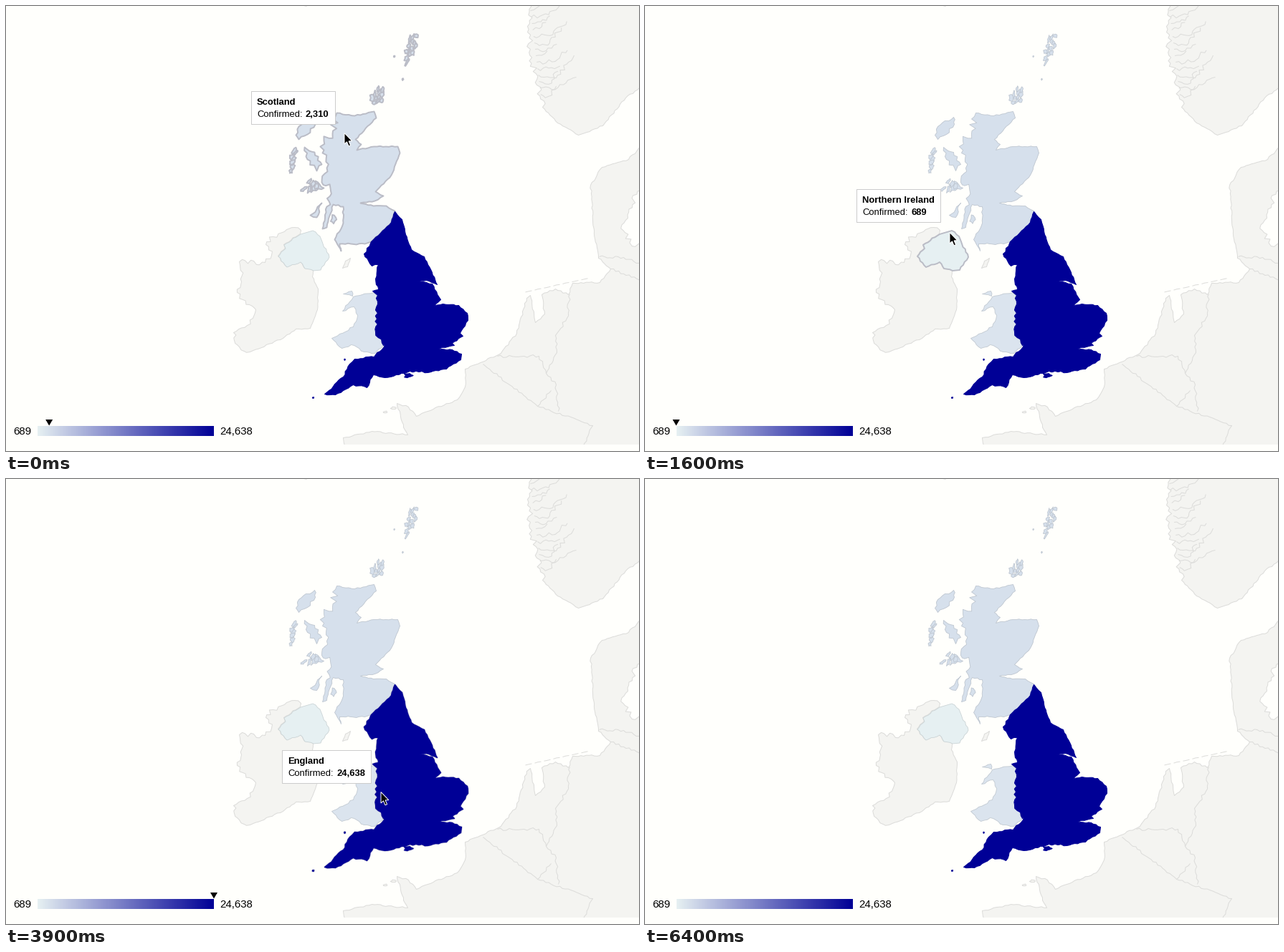
A matplotlib script for the animation above (6700 ms loop, 883 by 622 pixels).

```python
import numpy as np
import matplotlib.pyplot as plt
from matplotlib.animation import FuncAnimation
from matplotlib.collections import LineCollection, PolyCollection
from matplotlib.patches import Polygon, Rectangle

W, H, DPI = 883, 622, 100
FRAMES, STEP = 67, 100
PX = 72 / DPI
SEA, LAND, COAST = "#fffffc", "#f4f4f1", "#dcdcda"
LOW, HIGH = np.array([230, 240, 242]) / 255, np.array([0, 0, 150]) / 255
V_MIN, V_MAX = 689, 24638
rng = np.random.default_rng(4)


def coast(amp, *v):
    """Path through a few key points, ragged by up to amp pixels."""
    keys = np.reshape(v, (-1, 2)) + 0.5
    out = [keys[0]]
    for a, b in zip(keys[:-1], keys[1:]):
        d = b - a
        size = np.hypot(*d)
        n = max(1, round(size / 4))
        side = np.array([-d[1], d[0]]) / size
        out += [a + d * k / n + side * rng.uniform(-amp, amp)
                for k in range(1, n)]
        out.append(b)
    return np.array(out)


def island(amp, *v):
    return coast(amp, *v, *v[:2])


def ring(*parts):
    return np.vstack(parts)


def spin(x, y, turn):
    t = np.radians(turn)
    return np.array([x * np.cos(t) - y * np.sin(t),
                     x * np.sin(t) + y * np.cos(t)])


def islet(x, y, rx, ry, turn=0):
    a = np.linspace(0, 2 * np.pi, 11)[:-1]
    r = rng.uniform(0.5, 1.2, 10)
    return (spin(rx * r * np.cos(a), ry * r * np.sin(a), turn).T
            + (x + 0.5, y + 0.5))


def isles(n, x, y, rx, ry, turn=0):
    """Scatter n ragged islets in a tilted ellipse."""
    out = []
    for k in range(n):
        far, a = np.sqrt((k + 0.5) / n), 2.4 * k
        dx, dy = spin(rx * far * np.cos(a), ry * far * np.sin(a), turn)
        out.append(islet(x + dx, y + dy, rng.uniform(1.5, 3.5),
                         rng.uniform(3, 6), rng.uniform(0, 50)))
    return out


def shade(value):
    return LOW + (HIGH - LOW) * (value - V_MIN) / (V_MAX - V_MIN)


# Borders shared by two regions
scot_border = coast(0.6, 542, 287, 537, 302, 522, 317, 509, 329)
wales_border = coast(2.5, 518, 404, 517, 437, 515, 455, 526, 474)
ni_border = coast(1.2, 410, 318, 387, 333, 389, 338, 379, 349, 391, 364,
                  410, 357, 416, 366, 428, 369)

scot_east = coast(
    0.8, 461, 149, 486, 153, 513, 147, 516, 156, 487, 186, 495, 193, 489, 201,
    513, 196, 546, 196, 549, 205, 537, 236, 515, 259, 526, 265, 514, 272,
    494, 275, 512, 279, 530, 279, 542, 286)
scot_west = ring(
    coast(1, 500, 332, 465, 332, 467, 342, 458, 326, 470, 303, 470, 280,
          456, 277, 447, 309, 441, 311, 447, 280),
    coast(5, 447, 280, 452, 254, 440, 246, 447, 226, 441, 205, 443, 188,
          455, 178, 459, 154))
scotland = [
    ring(scot_east, scot_border, scot_west),
    island(2, 404, 180, 408, 168, 430, 155, 431, 165, 420, 179, 408, 186),
    island(2.5, 416, 197, 430, 204, 440, 221, 433, 230, 420, 214),
    island(2, 425, 260, 431, 244, 443, 254),
    island(2, 424, 292, 440, 275, 433, 295),
    islet(457, 297, 4, 7, 15), islet(553, 102, 1, 1.3), islet(541, 70, 1.2, 1),
    *isles(7, 400, 213, 3, 19, 8), *isles(5, 425, 250, 12, 8, -35),
    *isles(11, 518, 126, 8, 13, 20), *isles(14, 564, 58, 6, 23, 18)]

england = [
    ring(coast(0.7, 543, 288, 552, 298, 557, 319, 565, 340, 583, 350,
               594, 372, 601, 389, 586, 383, 574, 384, 594, 388, 606, 410,
               597, 419, 609, 416, 631, 418, 643, 429, 644, 439, 633, 457,
               637, 461, 622, 471, 625, 474, 600, 479, 622, 480, 635, 486),
         coast(1.2, 634, 494, 614, 507, 588, 512, 563, 510, 540, 517, 528, 519,
               512, 515, 503, 533, 484, 529, 459, 543, 444, 542, 470, 518,
               479, 500, 486, 493, 513, 490, 531, 471),
         wales_border[::-1],
         coast(1.8, 511, 398, 519, 396, 515, 381, 519, 361, 510, 363, 499, 346,
               508, 331),
         scot_border[::-1]),
    islet(561, 516, 7, 4), islet(428, 547, 1.2, 1), islet(472, 494, 0.8, 1.2)]

wales = [
    ring(wales_border,
         coast(1.2, 526, 474, 514, 485, 499, 483, 481, 473, 468, 478, 454, 464,
               484, 448, 490, 432, 485, 420, 469, 426, 484, 406, 512, 400)),
    island(1, 470, 402, 482, 398, 483, 405)]
n_ireland = [ring(ni_border, coast(1.2, 438, 368, 450, 350, 437, 321, 427, 313))]

# Neighbouring land
ireland = ring(
    ni_border,
    coast(0.8, 428, 369, 427, 378, 435, 395, 434, 424, 424, 450, 404, 451,
          386, 464, 340, 483),
    coast(3.5, 340, 483, 325, 476, 318, 467, 317, 456, 336, 446, 348, 424,
          330, 410, 322, 400, 328, 385, 325, 357, 361, 358, 370, 348, 362, 333,
          372, 322, 391, 312, 402, 309, 411, 313))
isle_man = island(0.5, 469, 366, 473, 356, 480, 352, 476, 364)
norway = ring(coast(5, 729, -4, 731, 60, 740, 110, 748, 141),
              coast(1, 748, 141, 769, 163, 798, 180, 832, 167, 864, 128,
                    890, 110))
norway = ring(norway, [(890, -4)])
continent = ring(
    coast(1.2, 890, 190, 868, 214, 831, 225, 815, 250, 818, 298, 826, 352,
          843, 367, 828, 386, 790, 387, 784, 403, 766, 395, 747, 403, 751, 430,
          738, 442, 731, 404),
    coast(1, 726, 408, 712, 457, 690, 485, 640, 507, 640, 532, 629, 550,
          588, 566, 572, 573, 561, 560, 545, 555, 556, 592, 560, 599, 510, 594,
          470, 603, 472, 618),
    [(890, 618)])
sound = coast(4, 890, 237, 868, 283, 858, 305, 869, 330, 890, 336)
borders = [
    coast(1.5, 665, 500, 702, 529, 741, 559, 818, 586, 805, 614),
    coast(2, 685, 489, 743, 489, 753, 513),
    coast(2, 786, 402, 782, 436, 766, 460, 768, 484, 753, 513, 767, 529,
          770, 566),
    coast(1.5, 760, 537, 741, 559),
    coast(1.5, 827, 350, 861, 351, 890, 362),
    coast(1.5, 843, 367, 890, 385)]
frisian = [coast(0.5, x, 397 - 0.22 * (x - 735), x + 9, 395 - 0.22 * (x - 735))
           for x in range(724, 812, 13)]
frisian.append(coast(0, 415, -1, 419, 0))
fjords = []
for k in range(14):
    x, y = 731 + 1.1 * k, 6 + 9 * k
    reach = rng.uniform(15, 55)
    fjords.append(coast(3, x, y, x + reach / 2, y + rng.uniform(-5, 5),
                        x + reach, y - reach * rng.uniform(0, 0.6)))
channel_isles = [islet(529, 567, 3, 1.5), islet(540, 562, 4, 2)]

REGIONS = {"Scotland": (2310, scotland), "Northern Ireland": (689, n_ireland),
           "Wales": (1837, wales), "England": (24638, england)}

# Pointer keys: frame, x, y
PATH = np.array([
    (3, 472, 177), (7, 463, 192), (10, 448, 226), (12, 426, 278),
    (17, 425, 326), (21, 428, 341), (24, 445, 361), (31, 489, 430),
    (32, 491, 432), (33, 491, 432), (39, 523, 437), (42, 543, 432),
    (43, 543, 432), (48, 554, 383), (50, 533, 327), (57, 461, 226),
    (62, 106, 10)])
LAG = 0.25
HOVER = [("Scotland", 0, 1), ("Scotland", 2, 12), ("Northern Ireland", 16, 24),
         ("Wales", 29, 38), ("England", 38, 51), ("Scotland", 51, 57)]
POINTER_GONE = 64

fig = plt.figure(figsize=(W / DPI, H / DPI), dpi=DPI, facecolor=SEA)
ax = fig.add_axes([0, 0, 1, 1])


def polys(shapes, face, edge, px, z):
    return ax.add_collection(PolyCollection(
        shapes, facecolors=[face], edgecolors=[edge], linewidths=px * PX,
        joinstyle="round", zorder=z), autolim=False)


def text(x, y, s, px, z, weight="normal"):
    return ax.text(x, y, s, size=px * PX, family="Liberation Sans",
                   weight=weight, color="black", va="baseline", zorder=z)


polys([continent, norway, ireland, isle_man] + channel_isles, LAND, COAST, 1, 1)
polys([sound], SEA, COAST, 1, 2)
ax.add_collection(LineCollection(fjords + borders + frisian, colors=COAST,
                                 linewidths=PX, zorder=2), autolim=False)
ax.add_patch(Rectangle((0, 613), W, 9, fc=SEA, ec="none", zorder=3))

glow = {}
for name, (value, shapes) in REGIONS.items():
    fill = shade(value)
    if name == "England":
        polys(shapes, fill, fill, 1, 5)
        glow[name] = [polys(shapes, fill, "#c4c4d4", 2.4, 6),
                      polys(shapes, fill, fill, 1.2, 6.1)]
    else:
        polys(shapes, fill, fill * 0.88, 0.8, 4)
        glow[name] = [polys(shapes, fill, "#babcc6", 1.9, 4.5)]

# Legend
ramp = LOW + (HIGH - LOW) * np.linspace(0, 1, 246)[:, None]
ax.imshow(ramp[None], extent=(44, 290, 601, 587), aspect="auto",
          interpolation="nearest", zorder=7)
text(10.5, 599, "689", 15, 7)
text(298, 599, "24,638", 15, 7)
TRI = np.array([(-5, 578), (5, 578), (0, 586.5)])
marker = ax.add_patch(Polygon(TRI, fc="black", ec="none", zorder=8))

# Tooltip and pointer
box = ax.add_patch(Rectangle((0, 0), 117, 46, fc="white", ec="#cccccc", lw=PX,
                             joinstyle="round", snap=False, zorder=9))
title = text(0, 0, "", 13, 10, "bold")
label = text(0, 0, "Confirmed:", 13, 10)
count = text(0, 0, "", 13, 10, "bold")
ARROW = np.array([(0, 0.5), (0, 16), (3.5, 12.8), (6, 18.8), (8.6, 17.7),
                  (6.1, 11.9), (10.8, 11.7)])
pointer = ax.add_patch(Polygon(ARROW, fc="black", ec="white", lw=PX,
                               joinstyle="miter", zorder=11))
ax.set(xlim=(0, W), ylim=(H, 0))
ax.axis("off")


def pointer_at(i):
    frames, xs, ys = PATH.T
    return np.round([np.interp(i, frames, xs), np.interp(i, frames, ys)])


def draw(i):
    pointer.set_xy(ARROW + pointer_at(i))
    pointer.set_visible(i < POINTER_GONE)

    active = next((n for n, a, b in HOVER if a <= i < b), None)
    for name, parts in glow.items():
        for part in parts:
            part.set_visible(name == active)
    for part in (box, title, label, count, marker):
        part.set_visible(active is not None)
    if active:
        value = REGIONS[active][0]
        width = 125 if value >= 10000 else 118
        # The tooltip trails the pointer slightly
        left, top = pointer_at(i - LAG) - (12 + width, 58)
        box.set_bounds(left + 0.5, top + 0.5, width - 1, 46)
        title.set_text(active)
        count.set_text(f"{value:,}")
        title.set_position((left + 8, top + 19))
        label.set_position((left + 8, top + 36))
        count.set_position((left + 76, top + 36))
        at = 43.5 + 246.5 * (value - V_MIN) / (V_MAX - V_MIN)
        marker.set_xy(TRI + (at, 0))
    return []


anim = FuncAnimation(fig, draw, frames=FRAMES, interval=STEP,
                     init_func=lambda: draw(0), repeat=True, repeat_delay=0)
plt.show()
```
